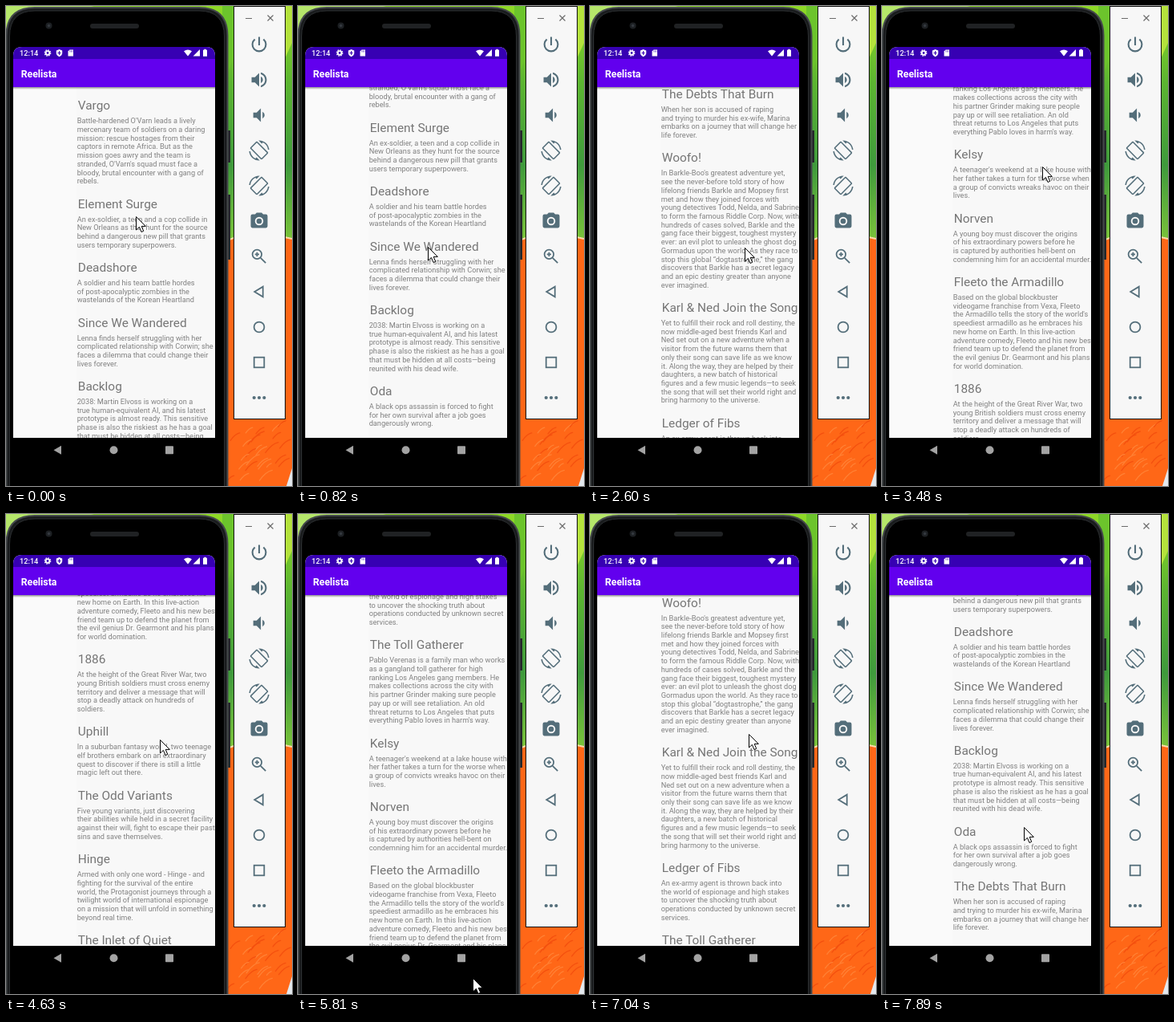
An HTML page for the animation above (8000 ms loop, 357 by 598 pixels).

```html
<!DOCTYPE html>
<html lang="en">
<head>
<meta charset="utf-8">
<title>Movie list scrolling</title>
<style>
html, body { margin: 0; width: 100%; height: 100%; overflow: hidden; background: #000; }
svg { display: block; width: 357px; height: 598px; font-family: Roboto, "Noto Sans", sans-serif; }
.head { font-size: 15.4px; fill: #757575; }
.body { font-size: 9.2px; fill: #808080; }
.tool { fill: #546e7a; }
.line { fill: none; stroke: #546e7a; stroke-width: 1.7; }
</style>
</head>
<body>
<svg viewBox="0 0 357 598">
  <defs>
    <clipPath id="view"><rect x="9" y="101" width="252" height="437"/></clipPath>
    <clipPath id="screen"><path d="M9 538V62q0-11 11-11H250q11 0 11 11V538z"/></clipPath>
    <linearGradient id="leaf" x2="0" y2="1">
      <stop offset="0" stop-color="#8fd926"/><stop offset=".3" stop-color="#5cb531"/>
      <stop offset=".62" stop-color="#3f9a3c"/><stop offset="1" stop-color="#8ccf3a"/>
    </linearGradient>
    <linearGradient id="shade" x2="0" y2="1">
      <stop offset="0" stop-opacity=".42"/><stop offset="1" stop-opacity="0"/>
    </linearGradient>
  </defs>

  <!-- wallpaper -->
  <rect width="357" height="320" fill="url(#leaf)"/>
  <path d="M0 0H110L0 30z" fill="#b5e66a"/>
  <path d="M340 0H357V46L346 70z" fill="#b4e23c"/>
  <path d="M270 0h16v60l-16 40z" fill="#6cc42c"/>
  <path d="M270 296Q300 276 357 290V598H230z" fill="#ff6717"/>
  <path d="M270 296Q300 276 357 290" fill="none" stroke="#ffd9a8" stroke-width="2"/>
  <g id="strokes" fill="none" stroke-linecap="round"></g>
  <path d="M357 576V598H350z" fill="#e4e9ee"/>

  <!-- phone -->
  <path d="M276 155h4v40h-4zM276 235h4v81h-4z" fill="#24272a"/>
  <path d="M.5 610V37Q.5 2 36 2H241Q276.500 2 276.500 37V610z" fill="#191b1d" stroke="#44484b" stroke-width="2"/>
  <path d="M4.500 610V38Q4.500 6 36 6H241Q272.500 6 272.500 38V610z" fill="#000" stroke="#2b2e30"/>
  <circle cx="53.500" cy="24.500" r="4" fill="#1d2023"/><circle cx="53.500" cy="24.500" r="1.700" fill="#34393f"/>
  <rect x="105" y="22" width="61" height="6" rx="3" fill="#202224"/>

  <g clip-path="url(#screen)">
    <rect x="9" y="51" width="252" height="487" fill="#fafafa"/>
    <rect x="88" y="101" width="173" height="437" fill="#f8f8f8"/>
    <g clip-path="url(#view)"><g id="list"></g></g>
    <rect x="9" y="51" width="252" height="15" fill="#3700b3"/>
    <rect x="9" y="66" width="252" height="35" fill="#6200ee"/>
    <rect x="9" y="101" width="252" height="3" fill="url(#shade)"/>
  </g>
  <g fill="#fff">
    <text x="17" y="61.500" font-size="9.200" font-weight="500">12:14</text>
    <text x="18.700" y="89" font-size="12.300" font-weight="700">Reelista</text>
    <circle cx="52" cy="58.500" r="2.300" fill="none" stroke="#fff" stroke-width="1.800"/>
    <circle cx="52" cy="58.500" r="3.700" fill="none" stroke="#fff" stroke-width="1.300" stroke-dasharray="1.600 1.275"/>
    <path d="M66.500 54l3.700 1.500v3q0 3-3.700 4.700-3.700-1.700-3.700-4.700v-3z"/>
    <path d="M66.500 56v5M64.500 58.500h4" stroke="#3700b3"/>
    <path d="M79.500 54.500H84V62.500H77.500V56.500z"/>
    <path d="M79.800 55.500v2M81.400 55.500v2M83 55.500v2" stroke="#3700b3" stroke-width=".6"/>
    <path d="M222 56.200Q227 52.600 232 56.200L227 62.500zM242 54V62.500H233.500z"/>
    <path d="M247.300 53.800h2.400v1h1.300v7.900h-5v-7.900h1.300z"/>
  </g>
  <g fill="#a3a3a3">
    <path d="M69 547.800V558.800L59.500 553.300z"/><circle cx="134.500" cy="553.300" r="5"/>
    <rect x="199" y="548.300" width="10" height="10" rx=".8"/>
  </g>

  <!-- emulator toolbar -->
  <rect x="284.500" y=".5" width="64" height="514" fill="#f7f7f7" stroke="#111"/>
  <path d="M299 15.500h8M326.500 11.500l7 7M333.500 11.500l-7 7" stroke="#6b6b6b" stroke-width="1.200"/>
  <g id="tools"></g>

  <path id="arrow" d="M.5 .5V17L4.400 13.400 7 19.500 9.700 18.300 7.200 12.400H12.300z" fill="#fff" stroke="#000" stroke-linejoin="round"/>
</svg>
<script>
const $ = id => document.getElementById(id);

// Each entry: heading, then its description lines.
const movies = `Vargo|Battle-hardened O'Varn leads a lively|mercenary team of soldiers on a daring|mission: rescue hostages from their|captors in remote Africa. But as the|mission goes awry and the team is|stranded, O'Varn's squad must face a|bloody, brutal encounter with a gang of|rebels.
Element Surge|An ex-soldier, a teen and a cop collide in|New Orleans as they hunt for the source|behind a dangerous new pill that grants|users temporary superpowers.
Deadshore|A soldier and his team battle hordes|of post-apocalyptic zombies in the|wastelands of the Korean Heartland
Since We Wandered|Lenna finds herself struggling with her|complicated relationship with Corwin; she|faces a dilemma that could change their|lives forever.
Backlog|2038: Martin Elvoss is working on a|true human-equivalent AI, and his latest|prototype is almost ready. This sensitive|phase is also the riskiest as he has a goal|that must be hidden at all costs—being|reunited with his dead wife.
Oda|A black ops assassin is forced to fight|for her own survival after a job goes|dangerously wrong.
The Debts That Burn|When her son is accused of raping|and trying to murder his ex-wife, Marina|embarks on a journey that will change her|life forever.
Woofo!|In Barkle-Boo's greatest adventure yet,|see the never-before told story of how|lifelong friends Barkle and Mopsey first|met and how they joined forces with|young detectives Todd, Nelda, and Sabrine|to form the famous Riddle Corp. Now, with|hundreds of cases solved, Barkle and the|gang face their biggest, toughest mystery|ever: an evil plot to unleash the ghost dog|Gormadus upon the world. As they race to|stop this global “dogtastrophe,” the gang|discovers that Barkle has a secret legacy|and an epic destiny greater than anyone|ever imagined.
Karl & Ned Join the Song|Yet to fulfill their rock and roll destiny, the|now middle-aged best friends Karl and|Ned set out on a new adventure when a|visitor from the future warns them that|only their song can save life as we know|it. Along the way, they are helped by their|daughters, a new batch of historical|figures and a few music legends—to seek|the song that will set their world right and|bring harmony to the universe.
Ledger of Fibs|An ex-army agent is thrown back into|the world of espionage and high stakes|to uncover the shocking truth about|operations conducted by unknown secret|services.
The Toll Gatherer|Pablo Verenas is a family man who works|as a gangland toll gatherer for high|ranking Los Angeles gang members. He|makes collections across the city with|his partner Grinder making sure people|pay up or will see retaliation. An old|threat returns to Los Angeles that puts|everything Pablo loves in harm's way.
Kelsy|A teenager's weekend at a lake house with|her father takes a turn for the worse when|a group of convicts wreaks havoc on their|lives.
Norven|A young boy must discover the origins|of his extraordinary powers before he|is captured by authorities hell-bent on|condemning him for an accidental murder.
Fleeto the Armadillo|Based on the global blockbuster|videogame franchise from Vexa, Fleeto|the Armadillo tells the story of the world's|speediest armadillo as he embraces his|new home on Earth. In this live-action|adventure comedy, Fleeto and his new best|friend team up to defend the planet from|the evil genius Dr. Gearmont and his plans|for world domination.
1886|At the height of the Great River War, two|young British soldiers must cross enemy|territory and deliver a message that will|stop a deadly attack on hundreds of|soldiers.
Uphill|In a suburban fantasy world, two teenage|elf brothers embark on an extraordinary|quest to discover if there is still a little|magic left out there.
The Odd Variants|Five young variants, just discovering|their abilities while held in a secret facility|against their will, fight to escape their past|sins and save themselves.
Hinge|Armed with only one word - Hinge - and|fighting for the survival of the entire|world, the Protagonist journeys through a|twilight world of international espionage|on a mission that will unfold in something|beyond real time.
The Inlet of Quiet`.split("\n").map(row => row.split("|"));

const LINE = 10.72, GAP = 36.5;

function addText(cls, x, y, text) {
  const node = document.createElementNS("http://www.w3.org/2000/svg", "text");
  node.setAttribute("class", cls);
  node.setAttribute("x", x);
  node.setAttribute("y", y.toFixed(2));
  node.textContent = text;
  $("list").appendChild(node);
}

let baseline = 129.4;
for (const [head, ...lines] of movies) {
  addText("head", 89.8, baseline, head);
  lines.forEach((text, i) => addText("body", 88.7, baseline + 16.9 + i * LINE, text));
  baseline += GAP + lines.length * LINE;
}

// Short brush marks over the orange part of the wallpaper.
let seed = 7;
const random = () => (seed = seed * 16807 % 2147483647) / 2147483647;
$("strokes").innerHTML = Array.from({ length: 26 }, (_, i) => {
  const x = 276 + random() * 70, y = 520 + random() * 78, size = 5 + random() * 12;
  return `<path d="M${x} ${y}q${size / 2} ${-size * .7} ${size} ${-size * .8}" stroke="${i % 2 ? "#ff8236" : "#f4500f"}" stroke-width="1.300"/>`;
}).join("");

// Toolbar icons on a 24-unit grid, one every 44 px.
const solid = d => `<path class="tool" fill-rule="evenodd" d="${d}"/>`;
const line = d => `<path class="line" d="${d}"/>`;
const wave = "M14 3.200v2.100c2.900.9 5 3.500 5 6.700s-2.100 5.800-5 6.700v2.100c4-.9 7-4.500 7-8.800s-3-7.900-7-8.800z";
const turn = solid("M16.500 2.500c3.300 1.600 5.600 4.700 6 8.500H24C23.400 4.800 18.300 0 12 0l-.7 0 3.800 3.800z"
  + "M10.200 1.750c-.6-.6-1.500-.6-2.100 0L1.750 8.100c-.6.6-.6 1.500 0 2.100l12 12c.6.6 1.500.6 2.100 0l6.400-6.400c.6-.6.6-1.500 0-2.100z"
  + "M14.800 21.200L2.800 9.200 9.200 2.800l12 12zM7.500 21.500C4.200 19.900 1.900 16.800 1.500 13H0C.6 19.200 5.700 24 12 24l.7 0-3.800-3.800z");
const icons = [
  solid("M13 3h-2v10h2zM17.800 5.200l-1.400 1.400C18 7.900 19 9.800 19 12a7 7 0 0 1-14 0c0-2.200 1-4.100 2.600-5.400L6.200 5.200A9 9 0 1 0 17.800 5.200z"),
  solid("M3 9v6h4l5 5V4L7 9zM14 8Q16.500 9.300 16.500 12T14 16z" + wave),
  solid("M5 9v6h4l5 5V4L9 9zM16 8Q18.500 9.300 18.500 12T16 16z"),
  turn,
  `<g transform="matrix(-1 0 0 1 24 0)">${turn}</g>`,
  solid("M9 2L7.200 4H4Q2 4 2 6V18Q2 20 4 20H20Q22 20 22 18V6Q22 4 20 4H16.800L15 2zM12 17a5 5 0 1 1 0-10 5 5 0 0 1 0 10z")
    + `<circle class="tool" cx="12" cy="12" r="3.200"/>`,
  `<circle class="line" cx="9.500" cy="9.500" r="5.500"/>` + line("M13.700 13.700L19.800 19.800M7 9.500h5M9.500 7v5"),
  line("M16.500 6V18L6.500 12z"),
  `<circle class="line" cx="12" cy="12" r="6.100"/>`,
  `<rect class="line" x="6" y="6" width="12" height="12"/>`,
  [6, 12, 18].map(x => `<circle class="tool" cx="${x}" cy="12" r="2"/>`).join("")
];
$("tools").innerHTML = icons.map((icon, i) =>
  `<g transform="translate(316 ${48 + 44 * i}) scale(1.05) translate(-12 -12)">${icon}</g>`).join("");

// Bursts of screen updates: start, end, count.
const bursts = [[130, 520, 4], [820, 1520, 6], [1790, 2030, 3], [2330, 3330, 8], [3480, 4470, 8],
  [4630, 5220, 5], [5500, 6470, 8], [6590, 7040, 4], [7320, 7890, 5]];

// Time, scroll offset, pointer x, pointer y.
const keys = [
  [0, 0, 162, 262], [130, 12, 162, 250], [520, 92, 163, 150],
  [820, 95, 162, 300], [1240, 190, 160, 86], [1520, 229.6, 160, 180],
  [1790, 229.6, 162, 282], [2030, 400, 165, 130],
  [2330, 430, 190, 400], [2620, 640, 196, 200], [2760, 720, 200, 380], [3330, 1080.3, 200, 140],
  [3480, 1080.3, 200, 200], [3760, 1200, 198, 130], [3900, 1230, 195, 380], [4470, 1376, 192, 160],
  [4630, 1376, 192, 281], [4920, 1270, 195, 470], [5220, 1200, 200, 300],
  [5500, 1180, 205, 330], [5777, 980, 218, 578], [6193, 860, 205, 250], [6470, 770, 200, 470],
  [6590, 760, 198, 300], [6890, 650, 198, 430], [7040, 612.3, 198, 274],
  [7320, 590, 196, 240], [7890, 179.2, 177, 390]
];

function lastUpdate(t) {
  let time = 0;
  for (const [start, end, count] of bursts) {
    if (t < start) break;
    const step = (end - start) / (count - 1);
    time = start + Math.min(count - 1, Math.floor((t - start) / step + 1e-6)) * step;
  }
  return time;
}

function pose(t) {
  const i = keys.findIndex(key => key[0] >= t);
  if (i < 1) return keys[i ? keys.length - 1 : 0];
  const a = keys[i - 1], b = keys[i], p = (t - a[0]) / (b[0] - a[0]);
  return a.map((v, k) => v + (b[k] - v) * p);
}

function draw(now) {
  const [, scroll, x, y] = pose(lastUpdate(now % 8000));
  $("list").setAttribute("transform", `translate(0 ${-scroll.toFixed(2)})`);
  $("arrow").setAttribute("transform", `translate(${Math.round(x)} ${Math.round(y)})`);
  requestAnimationFrame(draw);
}
draw(performance.now());
</script>
</body>
</html>
```
